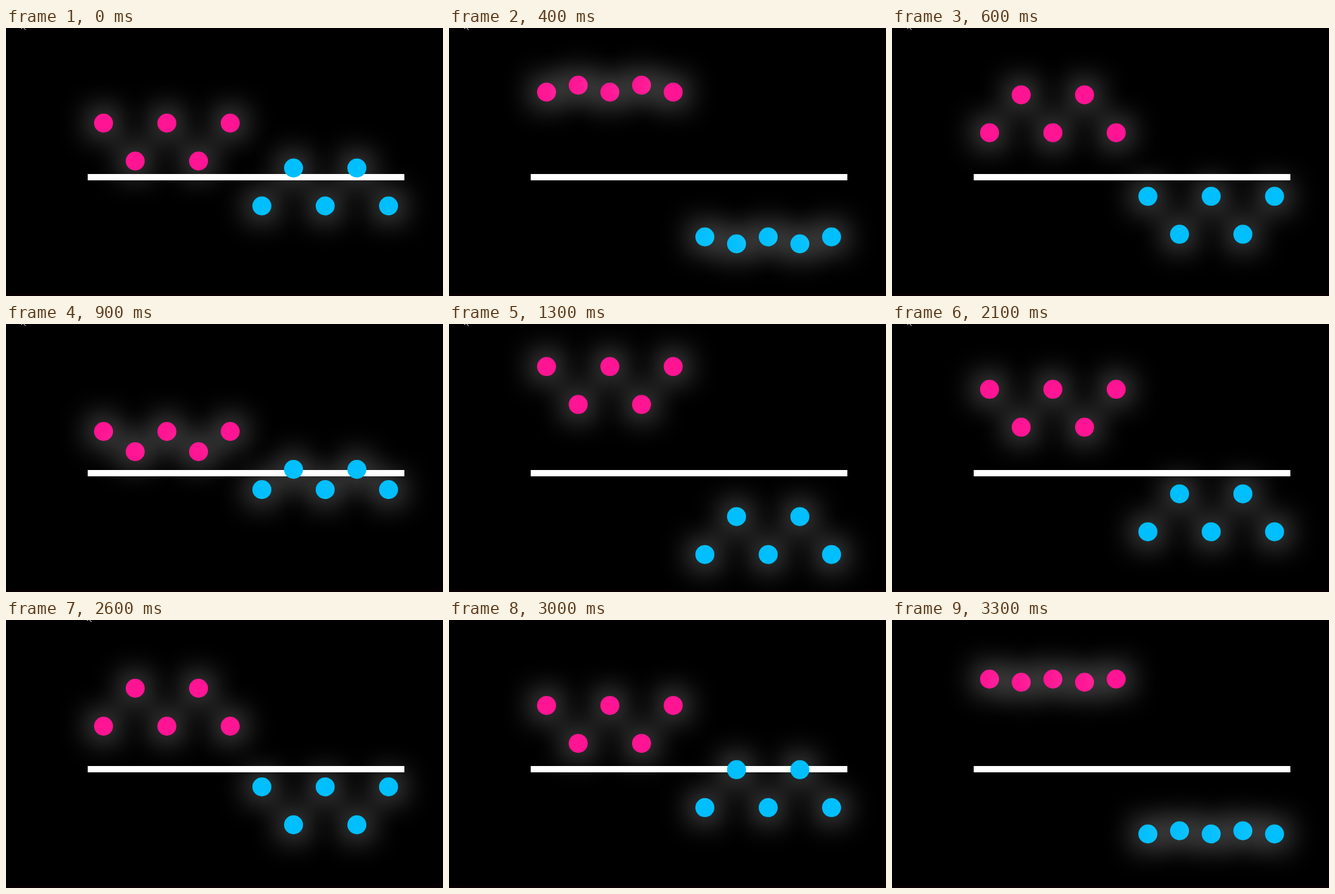
These frames come from a looping animation (690 by 424 pixels, 3400 ms). An HTML page:

```html
<!DOCTYPE html>
<html lang="en">
<head>
<meta charset="utf-8">
<title>Bouncing balls</title>
<style>
  html, body { margin: 0; width: 100%; height: 100%; overflow: hidden; background: #000; }
  #stage { position: relative; width: 690px; height: 424px; overflow: hidden; background: #000; }
  #stage > * { position: absolute; }
  .line { left: 129px; top: 231px; width: 500px; height: 10px; background: #fff; }
  .edge { left: 0; top: 420px; width: 690px; height: 4px; background: #080003; }
  .ball { top: 201px; width: 30px; height: 30px; border-radius: 50%; box-shadow: 0 0 50px #fff; }
  .up { background: #ff1493; }
  .down { background: #00bfff; }
  #pointer { left: 0; top: 0; }
</style>
</head>
<body>
<div id="stage">
  <div class="edge"></div>
  <div class="line"></div>
  <svg id="pointer" width="10" height="4" fill="none" stroke="#fff">
    <path d="M0 .5h1.5M4 0l3 3"/>
  </svg>
</div>
<script>
  const LOOP = 3400, STEP = 100, RISE = 150, LAG = 60;
  const stage = document.getElementById('stage');
  const pointer = document.getElementById('pointer');

  // [step, distance travelled]; the motion pauses twice
  const path = [[0, 65.5], [4, 185.5], [9, 346], [11, 415.5], [12, 415.5], [17, 581.5],
                [22, 745.5], [23, 745.5], [24, 779], [26, 852], [33, 1077.5]];

  const balls = Array.from({ length: 10 }, (_, i) => {
    const el = document.createElement('div');
    const up = i < 5;
    el.className = 'ball ' + (up ? 'up' : 'down');
    el.style.left = 139 + 50 * i + 'px';
    stage.append(el);
    return { el, dir: up ? -1 : 1, lag: (i % 5) % 2 * LAG };
  });

  function travelled(step) {
    const k = Math.max(1, path.findIndex(p => p[0] >= step));
    const [s0, d0] = path[k - 1], [s1, d1] = path[k];
    return d0 + (d1 - d0) * (step - s0) / (s1 - s0);
  }

  // Linear there-and-back motion
  const bounce = d => RISE - Math.abs(RISE - ((d % (2 * RISE)) + 2 * RISE) % (2 * RISE));

  function draw(time) {
    const step = Math.floor((time % LOOP) / STEP);
    const d = travelled(step);
    for (const { el, dir, lag } of balls)
      el.style.transform = `translateY(${dir * bounce(d - lag)}px)`;
    pointer.style.left = (step < 26 ? 24 : 128) + 'px';
    pointer.style.visibility = step < 27 ? 'visible' : 'hidden';
  }

  const start = performance.now();
  function tick() {
    draw(performance.now() - start);
    requestAnimationFrame(tick);
  }
  tick();
</script>
</body>
</html>
```
